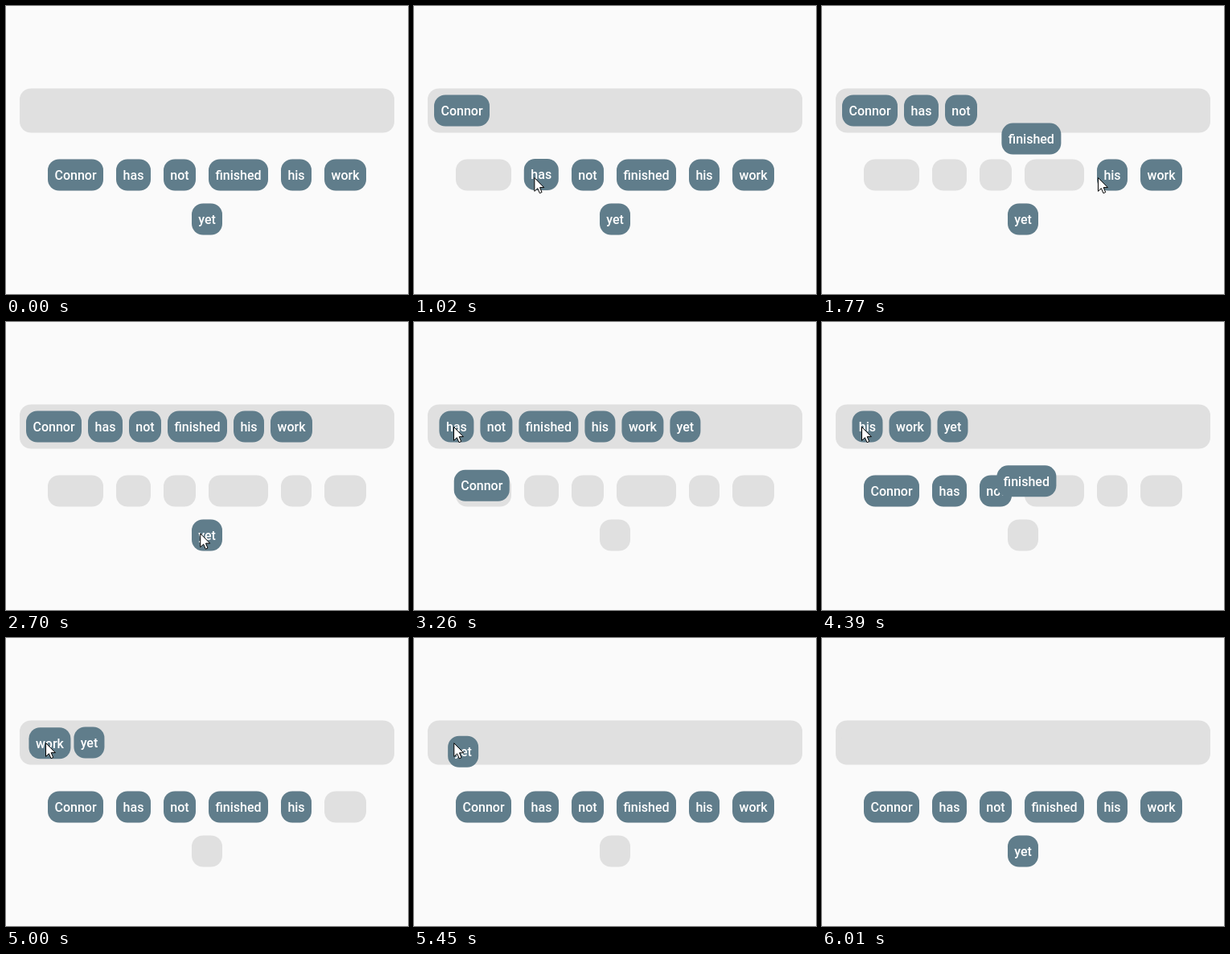
An HTML page that plays this animation: 500 by 358 pixels, repeating every 6.57 s.

```html
<!DOCTYPE html>
<html lang="en">
<head>
<meta charset="utf-8">
<title>Word ordering</title>
<style>
  html, body { margin: 0; width: 100%; height: 100%; overflow: hidden; background: #fafafa; }
  svg { display: block; }
  text { font: 500 16px Roboto, sans-serif; fill: #fff; text-anchor: middle; }
  .slot { fill: #e0e0e0; }
  .chip { fill: #607d8b; }
</style>
</head>
<body>
<svg id="stage" width="500" height="358" viewBox="0 0 500 358">
  <rect class="slot" x="17" y="102.5" width="466" height="55" rx="14"/>
</svg>
<script>
const LOOP = 6570, FLIGHT = 250, HOP = 175;
const HEIGHT = 39, BAR_GAP = 8, HOME_GAP = 16;
const BAR_X = 25, BAR_Y = 110.5, HOME_Y = 190.5;

const widths = { Connor: 69, has: 43, not: 40, finished: 74, his: 38, work: 52, yet: 38 };
const returns = [3062, 3468, 3818, 4210, 4594, 4984, 5400];

// Placing clicks come at slowly growing intervals.
const words = Object.entries(widths).map(([text, w], i) => ({
  text, w, placed: 715 + 284 * i + 7.9 * i * i, returned: returns[i]
}));

const stage = document.getElementById('stage');

function add(parent, tag, attrs) {
  const el = document.createElementNS('http://www.w3.org/2000/svg', tag);
  for (const key in attrs) el.setAttribute(key, attrs[key]);
  return parent.appendChild(el);
}

const move = (el, x, y) => el.setAttribute('transform', `translate(${x} ${y})`);
const quad = p => p < .5 ? 2 * p * p : 1 - 2 * (1 - p) ** 2;
const progress = (t, start, span = FLIGHT) =>
  quad(Math.min(1, Math.max(0, (t - start) / span)));

// Lays words out from x and stores each position under the given key.
function flow(row, key, x, gap) {
  for (const word of row) {
    word[key] = x;
    x += word.w + gap;
  }
}

flow(words, 'barX', BAR_X, BAR_GAP);
[words.slice(0, 6), words.slice(6)].forEach((row, i) => {
  const total = row.reduce((sum, { w }) => sum + w + HOME_GAP, -HOME_GAP);
  flow(row, 'x', (500 - total) / 2, HOME_GAP);
  for (const word of row) word.y = HOME_Y + i * (HEIGHT + HOME_GAP);
});

for (const { x, y, w } of words)
  add(stage, 'rect', { class: 'slot', x, y, width: w, height: HEIGHT, rx: 14 });
for (const word of words) {
  word.el = add(stage, 'g', {});
  add(word.el, 'rect', { class: 'chip', width: word.w, height: HEIGHT, rx: 14 });
  add(word.el, 'text', { x: word.w / 2, y: 25.5 }).textContent = word.text;
}
const pointer = add(stage, 'path', {
  d: 'M.5 .5V17.3L4.4 13.7L7 19.7L9.7 18.5L7.2 12.6H12.4Z',
  fill: '#fff', stroke: '#000', 'stroke-linejoin': 'round'
});

// The pointer enters, hops to each next word after a click, waits on the bar and leaves.
const entry = { x: 352, y: 366 };
const legs = [
  { start: 140, span: 420, x: 89, y: 208 },
  ...words.slice(1).map(({ x, y, w }, i) => ({
    start: words[i].placed, span: HOP,
    x: x + w * .27, y: HOME_Y + 22.5 + (y - HOME_Y) * .9
  })),
  { start: words[6].placed + 15, span: 300, x: 49, y: 130 },
  { start: 5440, span: 570, x: 440, y: 364 }
];

function drawWords(t) {
  let shift = 0;
  for (const { el, w, x, y, barX, placed, returned } of words) {
    const up = progress(t, placed), down = progress(t, returned);
    move(el,
      x + (barX - x) * up - shift + (x - BAR_X) * down,
      y + (BAR_Y - y) * (up - down));
    shift += (w + BAR_GAP) * down;
  }
}

function drawPointer(t) {
  let { x, y } = entry;
  for (const leg of legs) {
    const p = progress(t, leg.start, leg.span);
    x += (leg.x - x) * p;
    y += (leg.y - y) * p;
  }
  move(pointer, x, y);
}

const begin = performance.now();
function frame() {
  const t = (performance.now() - begin) % LOOP;
  drawWords(t);
  drawPointer(t);
  requestAnimationFrame(frame);
}
frame();
</script>
</body>
</html>
```
